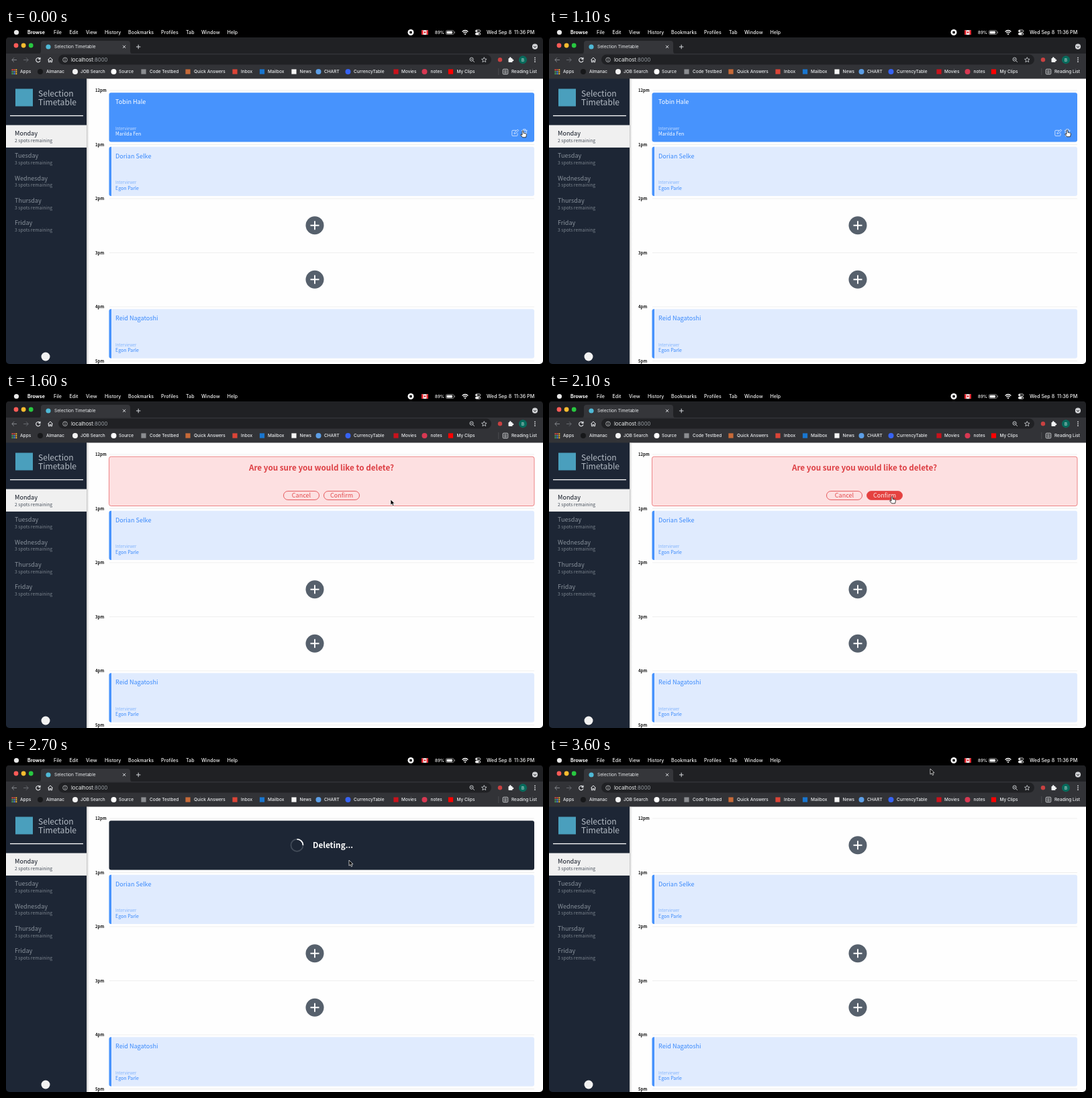
Write an HTML page that moves like this. It is 800 by 500 pixels and loops after 3700 ms.

```html
<!DOCTYPE html>
<html lang="en">
<head>
<meta charset="utf-8">
<title>Selection Timetable</title>
<style>
  html, body { margin: 0; width: 100%; height: 100%; overflow: hidden; background: #000; }
  svg { display: block; width: 800px; height: 500px; }
  .ui { font-family: Inter, Roboto, sans-serif; }
  .page { font-family: "Noto Sans CJK JP", "Noto Sans CJK SC", "Noto Sans CJK", "Open Sans", sans-serif; }
</style>
</head>
<body>
<svg id="stage" viewBox="0 0 800 500" xmlns="http://www.w3.org/2000/svg"></svg>
<script>
const LOOP = 3700, STEP = 100;
const DARK = '#1d2635', BLUE = '#4793fd', RED = '#e34b4e', HOUR = 80.5;

const text = (x, y, size, fill, str, extra = '') =>
  `<text x="${x}" y="${y}" font-size="${size}" fill="${fill}" ${extra}>${str}</text>`;
const rect = (x, y, w, h, fill, extra = '') =>
  `<rect x="${x}" y="${y}" width="${w}" height="${h}" fill="${fill}" ${extra}/>`;
const dot = (x, y, r, fill, extra = '') =>
  `<circle cx="${x}" cy="${y}" r="${r}" fill="${fill}" ${extra}/>`;
const line = (d, stroke, width = 1, extra = '') =>
  `<path d="${d}" fill="none" stroke="${stroke}" stroke-width="${width}" ${extra}/>`;
const group = (id, body) => `<g id="${id}">${body}</g>`;

function menuBar() {
  const items = [[71, 'File'], [94.5, 'Edit'], [119, 'View'], [147, 'History'], [182, 'Bookmarks'],
    [231, 'Profiles'], [268, 'Tab'], [291, 'Window'], [329.5, 'Help']];
  return dot(15.5, 6.5, 3.6, '#e8e8e8') +
    text(32, 9.2, 7.1, '#fff', 'Browse', 'font-weight="700"') +
    items.map(([x, s]) => text(x, 9.2, 7.1, '#f2f2f2', s, 'font-weight="500"')).join('') +
    dot(603, 6.5, 4.5, '#fff') + rect(601.3, 4.8, 3.4, 3.4, '#000', 'rx=".6"') +
    rect(619, 3.3, 10, 6.6, '#fff', 'rx="1"') + rect(619, 3.3, 2.6, 6.6, '#e0262f') +
    rect(626.4, 3.3, 2.6, 6.6, '#e0262f') + rect(622.8, 5.2, 2.4, 2.6, '#e0262f') +
    text(639, 9, 6.2, '#fff', '89%', 'font-weight="500"') +
    rect(655.5, 3.6, 11.5, 6, 'none', 'rx="1.6" stroke="#999" stroke-width=".8"') +
    rect(656.6, 4.7, 8.4, 3.8, '#fff', 'rx=".8"') + rect(667.8, 5.4, 1, 2.4, '#999') +
    line('M679.6 5.4Q684 1.6 688.4 5.4M681.3 7.2Q684 5 686.7 7.2', '#fff', 1.3) + dot(684, 9, 1.1, '#fff') +
    rect(699.4, 3, 7.4, 3, 'none', 'rx="1.5" stroke="#fff" stroke-width=".8"') + dot(701, 4.5, 1.2, '#fff') +
    rect(699, 7, 8, 3.6, '#fff', 'rx="1.8"') + dot(705, 8.8, 1.1, '#000') +
    text(716, 9.2, 7.2, '#f2f2f2', 'Wed Sep 8\u00a0 11:36 PM', 'font-weight="500"');
}

function tabStrip() {
  return rect(0, 14, 800, 25, '#202124') +
    ['#fc5b57', '#fdbc2f', '#28c840'].map((c, i) => dot(15 + i * 11.1, 26, 3.4, c)).join('') +
    '<path d="M48 38.5Q52 38.5 52 34V23Q52 19 56 19H181Q185 19 185 23V34Q185 38.5 189 38.5Z" fill="#35363a"/>' +
    dot(63, 28, 3.6, '#4fb9d6') +
    text(72, 30.3, 6.6, '#eceff1', 'Selection Timetable') +
    line('M174 25.8l4.2 4.2m0-4.2l-4.2 4.2', '#e3e5e8', .9) +
    line('M194 28h6.4M197.2 24.8v6.4', '#d5d8dc', 1) +
    dot(788, 27.7, 4.1, '#cfd1d4') + line('M786 27l2 2 2-2', '#202124', 1);
}

function toolBar() {
  return rect(0, 38, 800, 38, '#323337') + rect(78, 39.5, 645, 15, '#202124', 'rx="7.5"') +
    line('M16 47.5H9M12 44.3L8.8 47.5 12 50.7', '#84878c') +
    line('M26 47.5h7M30 44.3l3.2 3.2-3.2 3.2', '#66696e') +
    line('M50.2 45.4A3.2 3.2 0 1 0 51 48.4M51 43.8v2.6h-2.6', '#e8eaed', 1.1) +
    line('M62.4 47.4L66 44l3.6 3.4M63.4 47v3.8h1.8v-2.5h1.6v2.5h1.8V47', '#e8eaed', 1) +
    dot(88, 47.3, 3.3, 'none', 'stroke="#c4c7ca" stroke-width=".8"') + line('M88 46.8v2.4M88 45.2v.9', '#c4c7ca', .9) +
    text(97, 49.8, 7.7, '#f1f3f4', 'localhost<tspan fill="#9aa0a6">:8000</tspan>') +
    dot(693.6, 46.6, 2.6, 'none', 'stroke="#d5d8dc" stroke-width=".9"') + line('M695.5 48.5l2.4 2.4M692.4 46.6h2.4', '#d5d8dc', .9) +
    line('M712.3 43.6l1.1 2.5 2.7.2-2.1 1.8.7 2.6-2.4-1.4-2.4 1.4.7-2.6-2.1-1.8 2.7-.2z', '#d5d8dc', .8) +
    dot(736, 47.3, 3.2, '#c94141') +
    rect(748.5, 45, 6, 6, '#f1f3f4', 'rx=".8"') + dot(751.3, 44.6, 1.3, '#f1f3f4') + dot(755, 48, 1.3, '#f1f3f4') +
    dot(770, 47.3, 6, '#076b5c') + text(770, 49.6, 6.2, '#e7f2f0', 'B', 'text-anchor="middle"') +
    [44.4, 47.3, 50.2].map(y => dot(788, y, .85, '#e8eaed')).join('');
}

function bookmarks() {
  const marks = [
    [51, 60, 'Almanac', '#17181a'], [103, 111, 'JOB Search', '#f4f4f4'], [160.5, 168, 'Source', '#fff'],
    [205, 214, 'Code Testbed', '#8b8d91', 1], [271, 280, 'Quick Answers', '#c76a38', 1],
    [341, 350, 'Inbox', '#dc4437', 1], [381.5, 390, 'Mailbox', '#1976cf', 1], [429, 437.5, 'News', '#f5f5f5', 1],
    [465.5, 474, 'CHART', '#5c9ee6'], [509.5, 518, 'CurrencyTable', '#3763f3'],
    [581, 589, 'Movies', '#c9121c', 1], [623.5, 632.5, 'notes', '#d83852'], [662.5, 671.5, 'My Clips', '#f00', 1]];
  const label = (x, s) => text(x, 67.3, 6.5, '#eceef0', s, 'font-weight="500"');
  const colors = ['#ea4f43', '#ea4f43', '#f0b82d', '#46a85a', '#4b8bea', '#f0b82d', '#46a85a', '#4b8bea', '#f0b82d'];
  return colors.map((c, i) => rect(8.5 + i % 3 * 2.9, 61.3 + Math.floor(i / 3) * 2.9, 2, 2, c)).join('') +
    label(21, 'Apps') +
    marks.map(([ix, x, s, c, square]) =>
      (square ? rect(ix - 3.6, 61.4, 7.2, 7.2, c) : dot(ix, 65, 4, c)) + label(x, s)).join('') +
    rect(733.5, 60, .7, 10, '#55585d') +
    rect(740.3, 61.3, 7.4, 7.4, 'none', 'rx="1" stroke="#dfe1e4" stroke-width=".9"') +
    line('M742 63.6h4M742 65.2h4M742 66.8h4', '#dfe1e4', .7) + label(753, 'Reading List');
}

function sideBar() {
  const days = ['Monday', 'Tuesday', 'Wednesday', 'Thursday', 'Friday'];
  return rect(0, 75.5, 120, 425, DARK) +
    rect(14, 90.5, 26, 26, '#4a9fbd') +
    text(48, 102, 12.1, '#b4bcc5', 'Selection', 'font-weight="300"') +
    text(48, 114.5, 12.1, '#b4bcc5', 'Timetable', 'font-weight="300"') +
    rect(6, 129.9, 109, 1.3, '#fff') + rect(0, 144.5, 120, 33.4, '#f0f0f0') +
    days.map((day, i) => {
      const y = 160 + i * 33.35;
      return text(13, y, 9.1, i ? '#88919b' : '#0d1420', day) +
        text(13, y + 9.6, 6.8, i ? '#7b848e' : '#4a525d', `${i ? 3 : 2} spots remaining`, i ? '' : 'id="spots"');
    }).join('') +
    dot(59, 489, 6.5, '#f2f2f2');
}

const cardBox = (fill, extra = '') => rect(153.5, 96.2, 633.5, 73.3, fill, `rx="3" ${extra}`);

const cardText = (name, host, color, soft) =>
  text(163, 113, 9.1, color, name) + text(163, 151.6, 5.9, soft, 'Interviewer') + text(163, 160, 7.05, color, host);

const booking = (row, name, host) => `<g transform="translate(0 ${row * HOUR})">` + cardBox('#e0ebfe') +
  `<path d="M157 96.2V169.5H156.5Q153.5 169.5 153.5 166.5V99.2Q153.5 96.2 156.5 96.2Z" fill="${BLUE}"/>` +
  cardText(name, host, '#3a8afc', '#82b4fd') + '</g>';

const addButton = row => `<g transform="translate(460 ${132.8 + row * HOUR})">` +
  dot(0, 0, 13.5, '#56606c') + line('M-6.5 0H6.5M0 -6.5V6.5', '#fff', 1.9) + '</g>';

const pill = (x, label, id) =>
  rect(x, 147.6, 53, 12.8, 'none', `id="${id}Box" rx="6.4" stroke="${RED}" stroke-width=".9"`) +
  text(x + 26.5, 157.2, 9.05, RED, label, `id="${id}Text" text-anchor="middle"`);

function schedule() {
  const hours = ['12pm', '1pm', '2pm', '3pm', '4pm', '5pm'];
  return rect(120, 75.5, 680, 425, '#fefefe') + rect(120, 75.5, 5, 425, 'url(#edge)') +
    hours.map((h, i) => text(133, 95.2 + i * HOUR, 6, '#111', h, 'font-weight="700"') +
      rect(154, 92.6 + i * HOUR, 633, .7, '#e9e9e9')).join('') +
    booking(1, 'Dorian Selke', 'Egon Parle') + addButton(2) + addButton(3) + booking(4, 'Reid Nagatoshi', 'Egon Parle') +
    group('show', cardBox(BLUE) + cardText('Tobin Hale', 'Marilda Fen', '#fff', '#c2dbff') +
      line('M760 152.3H755Q753.8 152.3 753.8 153.5V159.4Q753.8 160.6 755 160.6H760.8Q762 160.6 762 159.4V156.5' +
        'M757 157.6l.4-2 4.8-4.6 1.5 1.5-4.8 4.7z', '#d4e5ff', .9) +
      line('M768 152.4h8.6M770.6 152v-1.3h3.4v1.3M769 153l.6 8h5.4l.6-8M771 154.5v5M772.3 154.5v5M773.6 154.5v5', '#d4e5ff', .9)) +
    group('ask', cardBox('#fde0e1', `stroke="${RED}" stroke-width=".65"`) +
      text(470, 117.2, 11.7, '#dd4045', 'Are you sure you would like to delete?', 'font-weight="600" text-anchor="middle"') +
      pill(413.5, 'Cancel', 'cancel') + pill(473.5, 'Confirm', 'confirm')) +
    group('deleting', cardBox(DARK) + dot(433.5, 132.8, 9, 'none', 'stroke="#434c59" stroke-width="1.7"') +
      line('M433.5 141.8A9 9 0 0 1 424.5 132.8', '#fff', 1.8, 'id="spinner"') +
      text(457, 137.4, 11.75, '#fff', 'Deleting...', 'font-weight="600"')) +
    group('empty', addButton(0));
}

const pointers =
  '<path id="arrow" d="M0 0V8.3L2 6.5 3.4 9.6 4.9 8.9 3.5 5.9H6.1Z" fill="#000" stroke="#fff" stroke-width=".7"/>' +
  '<path id="hand" d="M-1 1.5Q0 0 1 1.5V4.5L4.4 5.1Q5.6 5.5 5.4 6.9L4.6 10.8H-.4L-3.4 7.1Q-3.2 5.9 -2 6.5L-1 7.3Z" fill="#fff" stroke="#111" stroke-width=".8"/>';

const stage = document.getElementById('stage');
stage.innerHTML = `<defs>
  <clipPath id="frame"><rect y="13.5" width="800" height="486.5" rx="5"/></clipPath>
  <linearGradient id="edge"><stop stop-color="#999" stop-opacity=".6"/><stop offset="1" stop-color="#fff" stop-opacity="0"/></linearGradient>
  </defs>` + rect(0, 0, 800, 500, '#000') + '<g class="ui">' + menuBar() + '</g><g clip-path="url(#frame)"><g class="ui">' +
  tabStrip() + toolBar() + bookmarks() + '</g><g class="page">' + schedule() + sideBar() + '</g></g>' + group('pointer', pointers);

const el = id => document.getElementById(id);
const toggle = (id, on) => el(id).setAttribute('display', on ? 'inline' : 'none');

// Pointer stops: time, x, y
const path = [[0, 770, 152], [300, 772, 143], [500, 772, 151], [1300, 772, 151],
  [1600, 573, 160], [1900, 511, 155], [3200, 511, 155], [3600, 568, 19], [LOOP, 568, 19]];

function pointerAt(t) {
  const i = path.findIndex(p => p[0] > t);
  const [t0, x0, y0] = path[i - 1], [t1, x1, y1] = path[i];
  const u = (t - t0) / (t1 - t0), e = u * u * (3 - 2 * u);
  return [x0 + (x1 - x0) * e, y0 + (y1 - y0) * e];
}

function draw(t) {
  const state = t < 1300 ? 'show' : t < 2200 ? 'ask' : t < 3300 ? 'deleting' : 'empty';
  ['show', 'ask', 'deleting', 'empty'].forEach(id => toggle(id, id === state));
  el('spots').textContent = `${state === 'empty' ? 3 : 2} spots remaining`;
  el('spinner').setAttribute('transform', `rotate(${(t - 2200) * .36} 433.5 132.8)`);

  const [x, y] = pointerAt(t);
  const onConfirm = state === 'ask' && x > 473 && x < 527 && y > 147 && y < 161;
  const onTrash = state === 'show' && y > 149;
  el('confirmBox').setAttribute('fill', onConfirm ? '#e5413f' : 'none');
  el('confirmText').setAttribute('fill', onConfirm ? '#fde9e9' : RED);
  toggle('hand', onConfirm || onTrash);
  toggle('arrow', !onConfirm && !onTrash);
  el('pointer').setAttribute('transform', `translate(${x} ${y})`);
}

const start = performance.now();
function tick() {
  const t = (performance.now() - start) % LOOP;
  draw(Math.floor(t / STEP) * STEP);
  requestAnimationFrame(tick);
}
tick();
</script>
</body>
</html>
```
